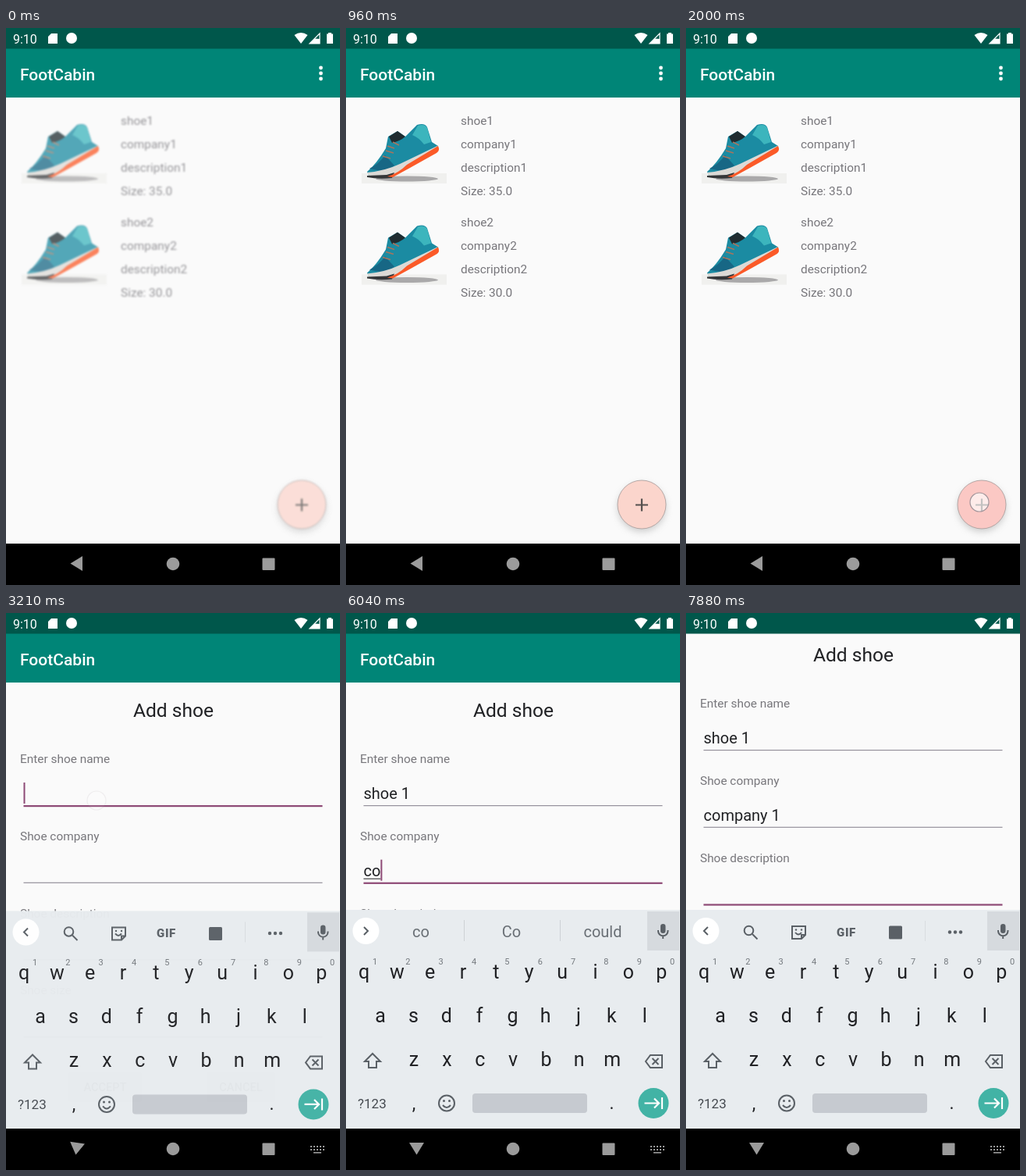
These frames come from a looping animation (428 px wide and 713 px high, 8 s). An HTML page:

```html
<!DOCTYPE html>
<html lang="en">
<head>
<meta charset="utf-8">
<title>Add shoe</title>
<style>
html, body { margin: 0; width: 100%; height: 100%; overflow: hidden; background: #000; }
svg { display: block; width: 428px; height: 713px; font-family: Roboto, "Noto Sans", sans-serif; }
text { white-space: pre; }
.mid { text-anchor: middle; }
.med { font-weight: 500; }
.line { fill: none; stroke: #5a6066; stroke-width: 2; }
</style>
</head>
<body>
<svg id="stage" viewBox="0 0 428 713"></svg>
<script>
const LOOP = 8000;
const PAPER = '#fafafa', MUTED = '#77767b', INK = '#202124', FOCUS = '#8e4a76', RULE = '#95919c';
const TEAL = '#008577', ICON = '#5a6066', KEYBOARD = '#e8ecef', NAV = '#9b9b9b';
const FIELD_GAP = 98.7;

const text = (x, y, size, fill, str, extra = '') =>
  `<text x="${x}" y="${y}" font-size="${size}" fill="${fill}" ${extra}>${str}</text>`;
const rect = (x, y, w, h, fill, extra = '') =>
  `<rect x="${x}" y="${y}" width="${w}" height="${h}" fill="${fill}" ${extra}/>`;
const circle = (x, y, r, fill, extra = '') =>
  `<circle cx="${x}" cy="${y}" r="${r}" fill="${fill}" ${extra}/>`;
const path = (d, fill, extra = '') => `<path d="${d}" fill="${fill}" ${extra}/>`;
const icon = (d, extra = '') => `<path class="line" d="${d}" ${extra}/>`;
const group = (id, body, extra = '') => `<g id="${id}" ${extra}>${body}</g>`;
const MID = 'class="mid"';

function shoe() {
  return rect(20, 186, 109, 13, '#f0f0ee') +
    `<ellipse cx="78" cy="193" rx="40" ry="3.5" fill="#aaa9aa"/>` +
    path('M27 184Q39 174 51 154L54 139L66 132L76 139L91 124Q101 121 104 127L110 146L118 151L112 159L63 187L30 190Z', '#1b8ba2') +
    path('M55 139L66 132L76 139Q69 145 59 147Z', '#202c30') +
    path('M92 125Q101 122 104 128L109 146L100 149Q93 140 85 137Z', '#3cb5bd') +
    path('M30 180Q42 174 50 163L62 176L50 184Z', '#176785') +
    path('M27 185Q50 183 69 174L117 151L118 156L62 188L31 191Z', '#dcdad6') +
    path('M27 189L52 188L62 185L59 192Q42 194 27 191Z', '#353739') +
    path('M53 190Q67 186 78 175L118 151Q121 157 116 160L82 179L60 191Z', '#fb5a28') +
    icon('M53 151l9 3M51 157l10 3M47 164l10 3M60 146l8 4', 'style="stroke:#a8745d;stroke-width:1.6"');
}

function listItem(y, lines) {
  return `<g transform="translate(0 ${y})">` + shoe() +
    lines.map((s, i) => text(147, 124 + i * 30, 15.4, MUTED, s)).join('') + '</g>';
}

function list() {
  return group('items',
    listItem(0, ['shoe1', 'company1', 'description1', 'Size: 35.0']) +
    listItem(129.5, ['shoe2', 'company2', 'description2', 'Size: 30.0']) +
    circle(379, 614, 31, '#aaa', 'opacity=".55" filter="url(#soft)"') +
    circle(379, 610, 31, '', 'id="fab" stroke="#a59a98" stroke-width=".8"') +
    path('M371 610.5h16M379 602.5v16', 'none', 'stroke="#55504e" stroke-width="2.2"'));
}

function form() {
  const labels = ['Enter shoe name', 'Shoe company', 'Shoe description', 'Shoe size'];
  const button = (x, w, s) => rect(x, 588, w, 37.5, '#d6d7d7', 'rx="2"') +
    text(x + w / 2, 612, 14.6, INK, s, 'class="mid med"');
  return text(214.5, 132.8, 24.6, INK, 'Add shoe', MID) +
    labels.map((s, i) => `<g transform="translate(0 ${i * FIELD_GAP})">` +
      text(18, 192.3, 15.4, MUTED, s) + text(22.5, 238.3, 20, INK, '', `id="value${i}"`) +
      rect(22.5, 246, 383, 1.2, RULE, `id="rule${i}"`) + '</g>').join('') +
    rect(0, 241, 0, 1, INK, 'id="composing"') + rect(0, 217, 2, 27, FOCUS, 'id="cursor"') +
    button(80, 94, 'ACCEPT') + button(257, 88, 'CANCEL');
}

function statusBar() {
  return rect(0, 0, 428, 26.5, '#00574b') + text(9, 19.5, 16, '#fff', '9:10') +
    path('M58 7h8v13H54V11Z', '#fff') + circle(84, 13, 7, '#fff') +
    path('M369.5 9Q378 3 386.5 9L378 20Z', '#fff') +
    path('M402 7V20H389Z', 'none', 'stroke="#fff" stroke-width="1.2"') +
    path('M402 14V20H389L395.5 13.5Z', '#fff') +
    path('M413 6h4v1.5h2V20h-8V7.5h2Z', '#fff');
}

function navBar() {
  const keyDots = path('M390 683h18M390 687h18', 'none', `stroke="${NAV}" stroke-width="2" stroke-dasharray="2 2"`) +
    rect(394, 690, 10, 1.6, NAV);
  return rect(0, 660, 428, 53, '#000') +
    path('M-9.5 -7.5H9.5L0 8Z', NAV, 'id="back"') +
    circle(214, 686, 8.3, NAV) + rect(328.5, 678.5, 16, 15.5, NAV, 'rx="1"') +
    group('hide', keyDots);
}

function toolStrip() {
  return icon('M28 402l-5 5 5 5') +
    icon('M85 411l6.5 6.5') + circle(80.5, 406.5, 5.8, 'none', 'class="line"') +
    icon('M136 401h17v11l-5 5h-12ZM148 417v-5h5M140 409q4 5 8 0') +
    circle(141, 405.5, 1.2, ICON) + circle(148, 405.5, 1.2, ICON) +
    text(205.5, 414, 15, ICON, 'GIF', 'class="mid" font-weight="900" letter-spacing=".6"') +
    rect(260, 400.5, 17, 17, ICON, 'rx="1.5"') + rect(306, 394, 1, 26, '#d9dde0') +
    [338, 345, 352].map(x => circle(x, 408.5, 2.2, ICON)).join('');
}

function wordStrip() {
  return icon('M23 402l5 5-5 5') +
    [96, 212, 329].map((x, i) => text(x, 414.5, 20, '#6a7076', '', `class="mid" id="word${i}"`)).join('') +
    rect(151, 393, 1, 27, '#cdd1d5') + rect(274, 393, 1, 27, '#cdd1d5');
}

function keyboard() {
  const rows = [['qwertyuiop', 23, 468], ['asdfghjkl', 44, 524], ['zxcvbnm', 87, 580]];
  const letters = rows.map(([s, x, y]) =>
    [...s].map((c, i) => text(x + i * 42.35, y, 25, INK, c, MID)).join('')).join('');
  const digits = [...'1234567890'].map((d, i) => text(37 + i * 42.35, 450, 11, '#73787d', d, MID)).join('');
  return rect(0, 380, 428, 340, KEYBOARD) + rect(386, 382, 41, 50, '#d6dade') +
    circle(25.5, 407, 17, '#fff') + group('tools', toolStrip()) + group('words', wordStrip()) +
    rect(403, 398, 6.5, 12, ICON, 'rx="3.2"') + icon('M400 406v1a6.2 6.2 0 0 0 12.5 0v-1M406.2 413v4') +
    letters + digits +
    icon('M34 564l-10 10h5v8h10v-8h5Z') +
    icon('M390 566h15v16h-15l-6-8ZM392.5 570l8 8M400.5 570l-8 8') +
    text(15, 634, 17, '#454a50', '?123') + text(87, 636, 23, INK, ',', MID) +
    circle(129, 627.5, 10, 'none', 'class="line"') + icon('M124 630q5 6 10 0') +
    circle(125.5, 624.5, 1.5, ICON) + circle(132.5, 624.5, 1.5, ICON) +
    rect(162, 615, 147, 25, '#c6cad0', 'rx="4"') + text(340.5, 635, 23, INK, '.', MID) +
    circle(394, 627.5, 19.5, '#42b3a5') +
    path('M382.5 627.5h18M395 621.5l6 6-6 6M405 620v15', 'none', 'stroke="#fff" stroke-width="2.2"');
}

document.getElementById('stage').innerHTML =
  '<defs><filter id="soft" x="-30%" y="-30%" width="160%" height="160%"><feGaussianBlur stdDeviation="4"/></filter></defs>' +
  rect(0, 0, 428, 713, PAPER) +
  group('page', rect(0, 26, 428, 63, TEAL) + text(18, 67, 21, '#fff', 'FootCabin', 'class="med"') +
    group('list', [51, 58, 65].map(y => circle(403.5, y, 2.4, '#fff')).join('') + list()) +
    group('form', form())) +
  group('keyboard', keyboard()) + statusBar() + navBar() +
  circle(0, 0, 12, '#fff', 'id="touch" fill-opacity=".65" stroke="#a0949a" stroke-width="1.2"');

const el = {};
document.querySelectorAll('[id]').forEach(node => el[node.id] = node);

// [time, key, suggestions]; no suggestions shows the tool strip
const presses = [
  [3750, 's', 's so she'], [3920, 'h', 'she sh show'], [4040, 'o', 'sho show shop'],
  [4210, 'e', 'shoe shoes show'], [4580, ' ', 'is and store'], [5080, '1'],
  [5630, 'next'], [5800, 'c', 'c can come'], [5960, 'o', 'co Co could'],
  [6170, 'm', 'com come coming'], [6460, 'p', 'comp company complete'],
  [6750, 'a', 'compa company compare'], [7040, 'n', 'compan company companies'],
  [7210, 'y', 'company companies Company'], [7380, ' ', 'is and has'], [7540, '1'],
  [7750, 'next']
];
const FAB_AT = 1920, FORM_AT = 2170, TAP_AT = 2750, FOCUS_AT = 2960, KEYS_AT = 3000, PAN_AT = 7750;

const clamp = v => Math.max(0, Math.min(1, v));
const progress = (t, from, to) => clamp((t - from) / (to - from));
const easeOut = p => 1 - (1 - p) ** 3;
const show = (node, on) => node.setAttribute('display', on ? 'inline' : 'none');
const move = (node, x, y) => node.setAttribute('transform', `translate(${x} ${y})`);

function typingAt(t) {
  const state = { values: ['', '', '', ''], field: t >= FOCUS_AT ? 0 : -1, words: null, blinkFrom: FOCUS_AT + 120 };
  for (const [time, key, words] of presses) {
    if (t < time) break;
    const next = key === 'next';
    if (next) state.field++;
    else state.values[state.field] += key;
    state.words = words ? words.split(' ') : null;
    state.blinkFrom = next ? time + 250 : time;
  }
  return state;
}

function drawForm(t, s) {
  s.values.forEach((v, i) => {
    el['value' + i].textContent = v;
    const rule = el['rule' + i], active = i === s.field;
    rule.setAttribute('height', active ? 2.2 : 1.2);
    rule.setAttribute('fill', active ? FOCUS : RULE);
  });
  const value = s.values[s.field] || '';
  const width = value ? el['value' + s.field].getComputedTextLength() : 0;
  const y = Math.max(0, s.field) * FIELD_GAP;
  show(el.cursor, t >= s.blinkFrom && (t - s.blinkFrom) % 1000 < 500);
  move(el.cursor, 22.5 + width, y);
  move(el.composing, 22.5, y);
  el.composing.setAttribute('width', value.includes(' ') ? 0 : width);
  move(el.page, 0, -71 * easeOut(progress(t, PAN_AT, PAN_AT + 120)));
}

function drawKeyboard(t, s) {
  const p = progress(t, KEYS_AT, KEYS_AT + 300);
  show(el.keyboard, p > 0);
  move(el.keyboard, 0, 56 * (1 - p) ** 3);
  el.keyboard.setAttribute('opacity', easeOut(p));
  show(el.tools, !s.words);
  show(el.words, s.words);
  (s.words || []).forEach((w, i) => el['word' + i].textContent = w);
  el.back.setAttribute('transform', `translate(90.5 685.5) rotate(${90 * (1 - p) ** 2})`);
  show(el.hide, p > 0);
}

function drawTouch(t) {
  const onFab = t >= FAB_AT && t < FORM_AT - 40;
  const onField = t >= TAP_AT && t < 3380;
  show(el.touch, onFab || onField);
  move(el.touch, ...(onFab ? [376, 607] : [116, 240]));
  el.touch.setAttribute('opacity', t < FOCUS_AT ? 1 : 0.3 * (1 - progress(t, FOCUS_AT, 3380)));
}

function render(t) {
  const s = typingAt(t);
  show(el.list, t < FORM_AT);
  show(el.form, t >= FORM_AT);

  const sharp = progress(t, 0, 700);
  el.items.style.filter = sharp < 1 ? `blur(${0.9 * (1 - sharp)}px)` : 'none';
  el.items.style.opacity = 0.75 + 0.25 * sharp;
  el.fab.setAttribute('fill', t >= FAB_AT ? '#fbc8c4' : '#fbd5cc');

  drawForm(t, s);
  drawKeyboard(t, s);
  drawTouch(t);
}

const start = performance.now();
function tick() {
  render((performance.now() - start) % LOOP);
  requestAnimationFrame(tick);
}
tick();
</script>
</body>
</html>
```
